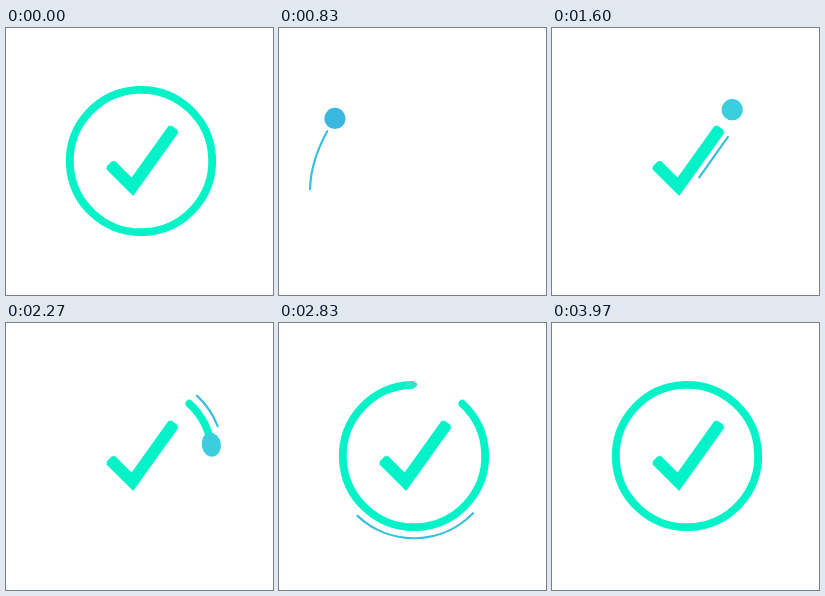
An HTML page that plays this animation: 267x267 px, repeating every 4010 ms.

```html
<!DOCTYPE html>
<html lang="en">
<head>
<meta charset="utf-8">
<title>Check animation</title>
<style>
  html, body { margin: 0; height: 100%; overflow: hidden; background: #fff; }
  svg { display: block; width: 100%; height: 100%; }
  path { fill: none; }
  .mark { stroke: #04f2c8; }
  .trail { stroke: #38bfdc; stroke-width: 2.2; stroke-linecap: round; }
</style>
</head>
<body>
<svg viewBox="0 0 267 267">
  <path id="flightTrail" class="trail"/>
  <path id="checkTrail" class="trail" d="M95.7 144.8 L124 173.5 Q127.5 177 130.4 173 L178 106"/>
  <path id="ringTrail" class="trail"/>
  <path id="check" class="mark" stroke-width="12"/>
  <path id="checkTips" class="mark" stroke-width="8.6"/>
  <path id="ring" class="mark" stroke-width="7.8" stroke-linecap="round"/>
  <ellipse id="ball"/>
</svg>
<script>
const LOOP = 4010, START = 500, APEX = 1000, LAND = 1170, TURN = 1820, RING = 2090, CLOSE = 2900;
const RING_ANGLE = -47.2;
const CHECK = 'M103.3 135.8 L126.4 158.8 L168.5 99.8';
const RISE = 'M44 229 C36 207 31 188 31 163 C31 138 42 110 59 86 C62 81 66 79 70 81';
const $ = id => document.getElementById(id);

function makePath(d) {
  const path = document.createElementNS('http://www.w3.org/2000/svg', 'path');
  path.setAttribute('d', d);
  return path;
}

function circlePath(r) {
  const a = RING_ANGLE * Math.PI / 180, x = r * Math.cos(a), y = r * Math.sin(a);
  const arc = s => `A${r} ${r} 0 0 1 ${135 + s * x} ${133 + s * y}`;
  return `M${135 + x} ${133 + y} ${arc(-1)} ${arc(1)}`;
}

$('flightTrail').setAttribute('d', RISE);
$('check').setAttribute('d', CHECK);
$('checkTips').setAttribute('d', CHECK);
$('ring').setAttribute('d', circlePath(71.2));
$('ringTrail').setAttribute('d', circlePath(82.3));

const rise = makePath(RISE);
const fall = makePath('M70 81 C84 92 92 120 103.3 135.8');
const swing = makePath(CHECK + ' L180 82 Q187 72 192 71');
const settle = makePath('M192 71 L183.4 80.8');

const progress = (t, from, to) => Math.min(1, Math.max(0, (t - from) / (to - from)));
const easeIn = (u, power = 2) => u ** power;
const easeOut = u => 1 - (1 - u) ** 2;
const smooth = (t, from, to) => (1 - Math.cos(Math.PI * progress(t, from, to))) / 2;

const riseAt = t => easeOut(progress(t, START, APEX));
const swingAt = t => easeOut(progress(t, LAND, TURN));
const ringAt = t => easeIn(progress(t, RING, CLOSE), 1.5);

function pointOn(path, part) {
  return path.getPointAtLength(part * path.getTotalLength());
}

function ballPoint(t) {
  if (t < APEX) return pointOn(rise, riseAt(t));
  if (t < LAND) return pointOn(fall, easeIn(progress(t, APEX, LAND)));
  if (t < TURN) return pointOn(swing, swingAt(t));
  if (t < RING) return pointOn(settle, smooth(t, TURN, RING));
  return pointOn($('ring'), ringAt(t));
}

// Shows only the stretch of a path between two lengths
function reveal(id, from, to) {
  const path = $(id), size = to - from;
  path.style.display = size > 0.2 ? '' : 'none';
  path.style.strokeDasharray = `${size} 1000`;
  path.style.strokeDashoffset = -from;
}

function revealPart(id, from, to) {
  const total = $(id).getTotalLength();
  reveal(id, from * total, to * total);
}

function drawBall(t) {
  const ball = $('ball'), { x, y } = ballPoint(t);
  const stretch = smooth(t, RING - 60, 2600);
  const size = smooth(t, 690, 830) * (1 - 0.7 * smooth(t, 2650, CLOSE));
  const turn = t < RING ? 0 : RING_ANGLE + 90 + 360 * ringAt(t);
  const hue = 194 - 8 * smooth(t, 830, 1600) - 16 * smooth(t, 2650, CLOSE);
  ball.style.display = size > 0 && t < CLOSE ? '' : 'none';
  ball.setAttribute('rx', size * (10.6 + 3.8 * stretch));
  ball.setAttribute('ry', size * (10.6 - 2.6 * stretch));
  ball.setAttribute('fill', `hsl(${hue} 72% 55%)`);
  ball.setAttribute('transform', `translate(${x} ${y}) rotate(${turn})`);
}

function draw(now) {
  let t = now % LOOP;
  if (t < START) t += LOOP;

  const drawn = Math.min(swingAt(t) * swing.getTotalLength(), $('check').getTotalLength());
  reveal('check', 1.4, drawn - 1.4);
  reveal('checkTips', 0, drawn);
  revealPart('ring', 0, ringAt(t));

  const lead = riseAt(t) * rise.getTotalLength() - 15;
  reveal('flightTrail', 150 * smooth(t, 650, 1030), lead);
  revealPart('checkTrail', smooth(t, 1350, 1800), smooth(t, 1200, 1650));
  const u = progress(t, 2100, 3135);
  revealPart('ringTrail', smooth(t, 2418, 3648), 0.42 * u + 0.58 * u ** 3);

  drawBall(t);
}

const begin = performance.now();
function tick() {
  draw(performance.now() - begin);
  requestAnimationFrame(tick);
}
tick();
</script>
</body>
</html>
```
